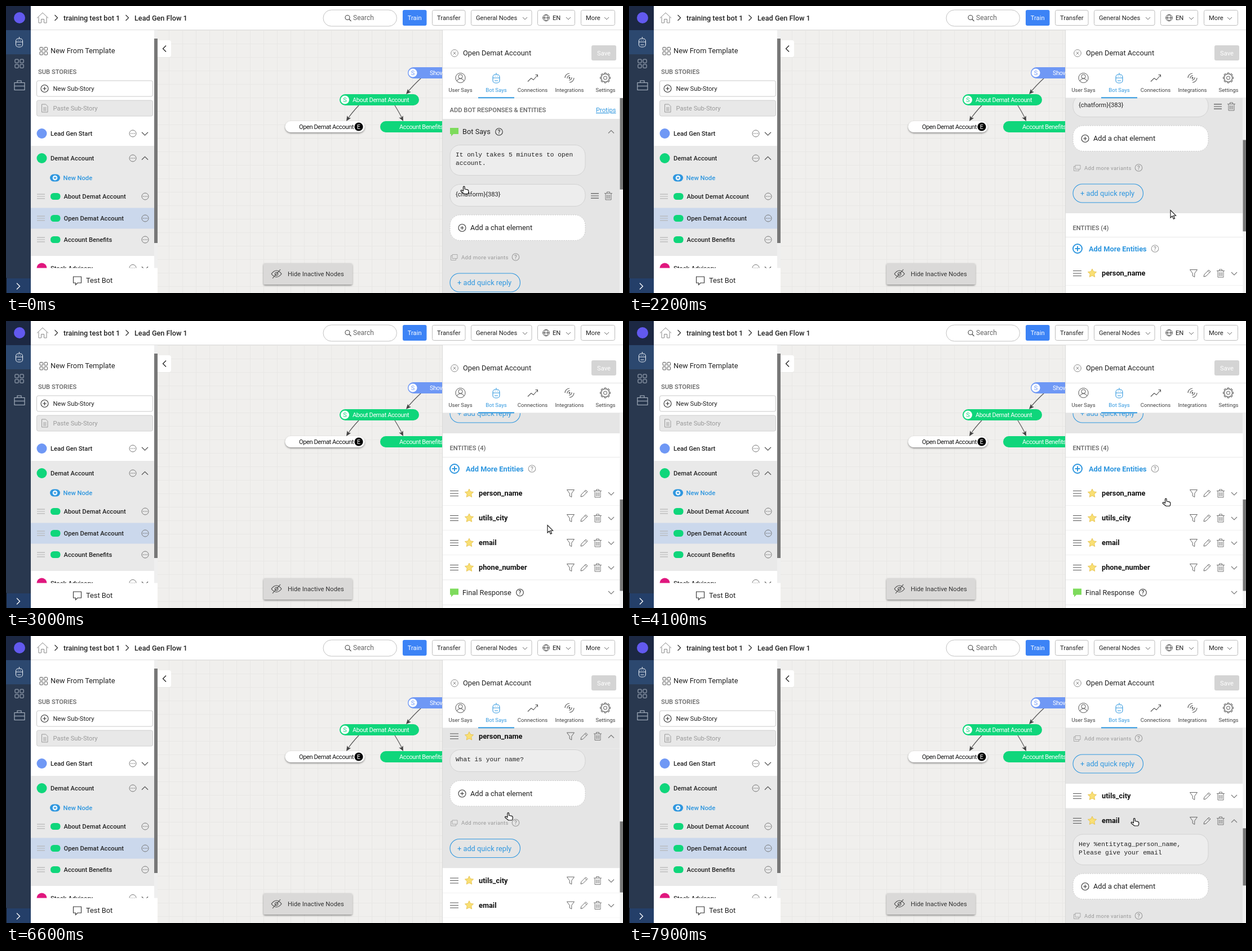
Recreate the animation shown at these times as an HTML page. Size 1095x511 px, loop 8000 ms.

```html
<!DOCTYPE html>
<html lang="en">
<head>
<meta charset="utf-8">
<title>Bot flow editor</title>
<style>
html, body { margin: 0; width: 100%; height: 100%; overflow: hidden; background: #fff; }
svg { display: block; width: 1095px; height: 511px; }
text { font-family: Roboto, sans-serif; white-space: pre; }
.mono { font-family: "Liberation Mono", monospace; }
</style>
</head>
<body>
<svg id="stage" viewBox="0 0 1095 511" xmlns="http://www.w3.org/2000/svg"></svg>
<script>
const INK = '#222', GREY = '#666', BLUE = '#2f97df', GREEN = '#0fd67b', PERI = '#6f98f5', SHADE = '#e5e5e5';

// Drawing helpers: each returns SVG markup.
const rect = (x, y, w, h, fill, extra = '') =>
  `<rect x="${x}" y="${y}" width="${w}" height="${h}" fill="${fill}" ${extra}/>`;
const disc = (x, y, r, fill, extra = '') => `<circle cx="${x}" cy="${y}" r="${r}" fill="${fill}" ${extra}/>`;
const ring = (x, y, r, color, w = 1) => disc(x, y, r, 'none', `stroke="${color}" stroke-width="${w}"`);
const line = (d, color = GREY, w = 1, extra = '') =>
  `<path d="${d}" fill="none" stroke="${color}" stroke-width="${w}" ${extra}/>`;
const shape = (d, fill, extra = '') => `<path d="${d}" fill="${fill}" ${extra}/>`;
const text = (x, y, s, size = 11.2, fill = INK, extra = '') =>
  `<text x="${x}" y="${y}" font-size="${size}" fill="${fill}" ${extra}>${s}</text>`;
const at = (x, y, body, extra = '') => `<g transform="translate(${x} ${y})" ${extra}>${body}</g>`;
const group = (id, body) => `<g id="${id}">${body}</g>`;
const MID = 'text-anchor="middle"', MEDIUM = 'font-weight="500"', BOLD = 'font-weight="700"';

// Icons
const CHEVRON = 'M-5 -2.5L0 2.5L5 -2.5';
const chevron = (x, y, s = 1, up = false, color = '#555', id = '') =>
  at(x, y, `<path ${id && `id="${id}"`} d="${CHEVRON}" transform="scale(${s} ${up ? -s : s})" fill="none" stroke="${color}" stroke-width="1.1"/>`);
const plusRing = (x, y, r = 6.5, color = '#333', w = 1.1) =>
  ring(x, y, r, color, w) + line(`M${x - r / 2} ${y}h${r}M${x} ${y - r / 2}v${r}`, color, w);
const help = (x, y, color = '#333') =>
  ring(x, y, 6.3, color, 1.1) + text(x, y + 3.6, '?', 10, color, MID + MEDIUM);
const dots = (x, y) => ring(x, y, 6, '#777') + [-3, 0, 3].map(d => disc(x + d, y, .8, '#666')).join('');
const bars = (x, y, color = '#555', gap = 4.5, w = 15) =>
  line([-gap, 0, gap].map(d => `M${x - w / 2} ${y + d}h${w}`).join(''), color, 1.2);
const squares = (x, y, s, color) =>
  [0, 1, 2, 3].map(i => rect(x + (i % 2) * s * 1.45, y + (i >> 1) * s * 1.45, s, s, 'none', `rx="1" stroke="${color}"`)).join('');
const trash = (x, y) => at(x, y, line('M-7 -4.5H7M-2.5 -4.5V-7H2.5V-4.5M-5 -4.5V7H5V-4.5M-2.4 -2V5M0 -2V5M2.4 -2V5', '#777'));
const funnel = (x, y) => at(x, y, line('M-6.5 -6.5H6.5L1.8 0V6.5L-1.8 4.5V0Z', '#666'));
const pencil = (x, y) => at(x, y, line('M-6 6L-5 2L3 -6L6 -3L-2 5ZM1.3 -4.3L4.3 -1.3', '#666'));
const bubbleIcon = (x, y) => shape(`M${x} ${y}h15v11h-9l-4 4v-4h-2z`, '#7edb5c');
const robot = (x, y, color) => at(x, y,
  rect(-6, -6, 12, 15, 'none', `rx="4.5" stroke="${color}" stroke-width="1.1"`) +
  line('M-6 0H6M0 -6V-9M-2.5 -3h1.2M1.3 -3h1.2M-3 5H3', color));
const star = (x, y) => {
  const pts = Array.from({ length: 10 }, (_, i) => {
    const a = Math.PI * (i / 5 - .5), r = i % 2 ? 4 : 8;
    return (x + r * Math.cos(a)).toFixed(1) + ',' + (y + r * Math.sin(a)).toFixed(1);
  });
  return `<polygon points="${pts.join(' ')}" fill="#f9df74" stroke="#e3bd45" stroke-width=".8" stroke-linejoin="round"/>`;
};

function sideRail() {
  return rect(0, 0, 44, 511, '#29384f') + rect(0, 0, 44, 43, '#1c2843') + rect(0, 43, 44, 43, '#2c486f') +
    rect(0, 485, 44, 26, '#243f69') + disc(24, 21, 10, '#6259ee') + robot(23.5, 64, '#e4e9f0') +
    squares(16, 95, 6.2, '#aeb8c6') +
    line('M15 136.500h18v13h-18zM20 136.500v-3.500h7v3.500M15 142.500h18', '#aeb8c6', 1.1) +
    line('M19 493.500l5.500 5.500l-5.500 5.500', '#fff', 1.3) + rect(0, 484, 1, 27, '#111');
}

function topBar() {
  const button = (x, w) => rect(x, 7.5, w, 27, '#fff', 'rx="3" stroke="#bcbcbc"');
  return rect(44, 0, 1051, 42.5, '#fff') + rect(44, 42, 1051, 1, '#dedede') +
    line('M55 21.500L65 12l10 9.500M58 19.500V30h4.500v-6.500h5V30H72V19.500', '#888') +
    line('M86.500 16l5 5l-5 5M212.500 16l5 5l-5 5', '#333', 1.3) +
    text(102, 25.5, 'training test bot 1', 12.7, INK, MEDIUM) +
    text(228, 25.5, 'Lead Gen Flow 1', 12.7, INK, MEDIUM) +
    rect(563, 7, 130.5, 29, '#fff', 'rx="14.500" stroke="#c2c2c2"') + ring(606, 20.5, 4, '#444', 1.1) +
    line('M609 23.500l3.500 3.500', '#444', 1.1) + text(616, 25, 'Search', 12, GREY) +
    rect(704, 7, 42.5, 28, '#3c83f6', 'rx="3"') + text(725.2, 25, 'Train', 11.2, '#fff', MID) +
    button(756.5, 58.5) + text(785.8, 25, 'Transfer', 11.2, INK, MID) +
    button(825.5, 107.500) + text(834, 25, 'General Nodes') + chevron(921, 22, .8) +
    button(943.5, 66) + ring(958.5, 21, 5.7, '#444') + line('M952.800 21h11.400M958.500 15.300c-4 4 -4 7.400 0 11.400c4 -4 4 -7.400 0 -11.400', '#444') +
    text(970, 25, 'EN') + chevron(998, 22, .8) +
    button(1020.5, 60) + text(1029, 25, 'More') + chevron(1066, 22, .8);
}

function storyList() {
  const story = (y, color, name, up) => disc(63.5, y, 9, color) + text(79, y + 4, name, 11.2, INK, MEDIUM) +
    dots(225, y) + chevron(246.5, y + (up ? 0 : .5), 1.1, up);
  const node = (y, name) => bars(62, y, '#b5b5b5', 3.8, 14) + rect(79, y - 6, 17.5, 12, GREEN, 'rx="5.500"') +
    text(102.5, y + 4, name, 11.2, INK, MEDIUM) + dots(247, y);
  return rect(44, 43, 225, 468, '#fff') + squares(60, 73.5, 5.5, '#555') + text(79, 84, 'New From Template', 12.8) +
    text(57, 121, 'SUB STORIES', 11.2, GREY, MEDIUM) +
    rect(54.5, 133, 206, 28, '#fff', 'rx="3" stroke="#c9c9c9"') + plusRing(68.5, 147) + text(83.5, 151, 'New Sub-Story') +
    rect(54.5, 168, 206, 28, '#e8e8e8', 'rx="3" stroke="#cfcfcf"') +
    line('M63.500 175h7l3.500 3.500V189H63.500zM66 181h5.500M66 183.500h5.500M66 186h5.500', '#999') + text(83.5, 186, 'Paste Sub-Story', 11.2, '#999') +
    story(227, PERI, 'Lead Gen Start') + rect(44, 249, 219, 196, '#e9e9e9') + story(271, GREEN, 'Demat Account', true) +
    rect(78, 299.5, 18, 13, BLUE, 'rx="6.500"') + disc(87, 306, 4.3, '#fff') + line('M84.500 306h5M87 303.500v5', BLUE, 1.3) +
    text(101.5, 310, 'New Node', 11.2, BLUE, MEDIUM) + rect(44, 359.5, 219, 37, '#cbd8ec') +
    node(339, 'About Demat Account') + node(378, 'Open Demat Account') + node(416, 'Account Benefits') +
    story(466.5, '#e0177e', 'Stock Advisory') + rect(263, 43, 6, 424, '#efefef') + rect(263, 58, 6, 364, '#777') +
    rect(44, 466.5, 225, 45, '#fff') +
    line('M119.500 482h14v11h-6.500l-3.500 3.500v-3.500h-4z', '#333', 1.1) + text(142, 493, 'Test Bot', 12.8);
}

function canvas() {
  const label = (x, y, s, color) => text(x, y + 4, s, 11, color, 'letter-spacing="-.4"');
  const pill = (x, y, w, color, extra = '') => rect(x, y - 10, w, 20, color, 'rx="10" ' + extra);
  const badge = (x, y, s, bg, fg) => disc(x, y, 7.6, bg) + text(x, y + 4, s, 11, fg, MID);
  const arrow = (d, x, y, turn) => line(d, '#555', 1.2) +
    shape('M0 0L-4 -9L0 -7L4 -9Z', '#444', `transform="translate(${x} ${y}) rotate(${turn})"`);
  return rect(269, 43, 506, 468, '#f0efed') + rect(269, 43, 506, 468, 'url(#grid)') +
    arrow('M737 128Q723 141 713 153', 710, 157, 42) + arrow('M626 177Q614 190 607 200', 604, 205, 32) +
    arrow('M690 177Q698 190 703 200', 705, 205, -26) +
    pill(713, 119, 140, PERI) + badge(722, 119, 'S', '#fff', PERI) + label(752, 119, 'Show', '#fff') +
    pill(592, 167, 141, GREEN) + badge(601.5, 167, 'S', '#fff', GREEN) + label(615, 167, 'About Demat Account', '#fff') +
    pill(495.5, 215, 141, '#fff', 'filter="url(#drop)"') + badge(626, 215, 'E', '#000', '#fff') +
    label(520, 215, 'Open Demat Account', '#111') + pill(664, 215, 141, GREEN) + label(698, 215, 'Account Benefits', '#fff') +
    shape('M269 61h20q4 0 4 4v22q0 4 -4 4h-20z', '#fff') + line('M284 70.500l-5.500 5.500l5.500 5.500', '#222', 1.3) +
    rect(457, 458, 157.5, 38, '#dad9d8', 'rx="3" filter="url(#drop)"') +
    line('M471 477q9 -12 18 0q-9 11 -18 0M473 485l14 -16', '#444', 1.1) + ring(480, 477, 2.8, '#444') +
    text(500, 481, 'Hide Inactive Nodes', 11.2, '#333');
}

function panelHead() {
  const tab = (x, name, color = '#444') => text(x, 153, name, 9.6, color, MID);
  const teeth = Array.from({ length: 8 }, (_, i) => `<path d="M-2 -7L-1.300 -9H1.300L2 -7" transform="rotate(${i * 45})"/>`).join('');
  return rect(775, 43, 320, 121, '#fff') + ring(796, 84, 6.3, '#888') + line('M793.500 81.500l5 5M798.500 81.500l-5 5', '#888') +
    text(811, 88, 'Open Demat Account', 12.8) + rect(1039, 70, 44, 27, '#d4d4d4', 'rx="3"') +
    text(1061, 88, 'Save', 11.2, '#fff', MID) + rect(775, 110, 320, 1, '#e2e2e2') +
    ring(806.5, 128, 8.6, '#555') + ring(806.5, 125.5, 3.6, '#555') + line('M800.500 134q0 -4 6 -4.500q6 .5 6 4.500', '#555') +
    robot(870, 128, BLUE) + line('M926 134.500l6 -6l4 3l7.500 -8.500M939.500 122.500h4v4', '#555', 1.1) +
    at(1000, 128, line('M-8 0A8 8 0 0 1 0 -8M-4 1A4.500 4.500 0 0 1 1 -4M8 0A8 8 0 0 1 0 8M4 -1A4.500 4.500 0 0 1 -1 4', '#555', 1.1) + disc(0, 0, 1.5, '#555')) +
    at(1063.5, 128, ring(0, 0, 7, '#555') + ring(0, 0, 3, '#555') + teeth, 'fill="none" stroke="#555"') +
    tab(806.500, 'User Says') + tab(870, 'Bot Says', BLUE) + tab(934.5, 'Connections') + tab(1000, 'Integrations') + tab(1064, 'Settings') +
    rect(775, 163.5, 320, .7, '#ddd') + rect(838, 162.3, 64, 2, BLUE);
}

const bubble = (y, h) => rect(788, y, 240, h, '#ededed', 'rx="18" stroke="#d2d2d2"');
const mono = (y, s) => text(798, y, s, 11.2, INK, 'class="mono"');
const tools = (id, y) => group(id, bars(1045, y, '#555', 4.2, 14) + trash(1069, y));

// "Add a chat element", variants and quick reply, from the top of the dashed box.
const composer = y =>
  rect(788, y, 240, 45.5, '#fff', 'rx="18" stroke="#c8c8c8" stroke-dasharray="2 2"') + plusRing(809.5, y + 23) +
  text(824, y + 27, 'Add a chat element', 12.8) +
  line(`M792 ${y + 70.5}h9v7h-9zM792 ${y + 72.500}h-2.500v8h9v-3`, '#aaa') +
  text(808, y + 78.5, 'Add more variants', 9.6, '#999', 'letter-spacing=".35"') + help(904.5, y + 75, '#999') +
  rect(788, y + 104, 124.5, 33, 'none', `rx="16.500" stroke="${BLUE}" stroke-width="1.1"`) +
  text(801, y + 125, '+ add quick reply', 12.8, BLUE);

function entity(y, name) {
  return rect(775, y - 22, 314.5, 44, '#fff', `id="${name}-bg"`) + rect(775, y + 21.500, 314.5, .8, '#e3e3e3', `id="${name}-rule"`) +
    bars(795.5, y) + star(822, y) + text(839, y + 4, name, 12.8, '#111', BOLD) +
    funnel(1002, y) + pencil(1026, y) + trash(1050, y) + chevron(1074, y + .5, 1, false, '#777', name + '-chev');
}

function panelBody() {
  return rect(775, 164, 320, 1300, '#fff') + text(787.5, 189, 'ADD BOT RESPONSES &amp; ENTITIES', 11.2, GREY, MEDIUM) +
    text(1047, 189, 'Protips', 11.2, BLUE, 'text-decoration="underline"') +
    rect(775, 201, 314.5, 327, SHADE) + bubbleIcon(788, 217) + text(810, 228, 'Bot Says', 12.8) + help(875, 224) +
    chevron(1074, 224, 1, true, '#777') +
    bubble(247.5, 54) + mono(268, 'It only takes 5 minutes to open') + mono(283, 'account.') +
    bubble(317.5, 39) + text(798, 338.5, '{chatform}{383}') + tools('tools-form', 338) + composer(372) +
    text(787.5, 558, 'ENTITIES (4)', 11.2, GREY, MEDIUM) + rect(775, 570, 314.5, .8, '#e3e3e3') +
    ring(796, 591, 8, BLUE, 2) + line('M791.500 591h9M796 586.500v9', BLUE, 2) +
    text(816, 595.5, 'Add More Entities', 12.8, BLUE, BOLD) + help(933.5, 591, '#999') + rect(775, 613, 314.5, .8, '#e3e3e3') +
    rect(775, 657, 314.5, 213, SHADE) + bubble(659, 39) + mono(679.5, 'What is your name?') + tools('tools-name', 679) +
    composer(714) + entity(635, 'person_name') +
    group('after-name',
      rect(775, 657, 314.5, 700, '#fff') + entity(679, 'utils_city') +
      rect(775, 745, 314.5, 228, SHADE) + bubble(747, 54.5) + mono(768, 'Hey %entitytag_person_name,') +
      mono(783, 'Please give your email') + composer(817) + entity(723, 'email') +
      group('after-email', rect(775, 745, 314.5, 700, '#fff') + entity(767, 'phone_number') +
        bubbleIcon(788, 804.500) + text(810, 815.5, 'Final Response', 12.8) + help(912, 811.5) +
        chevron(1074, 811.5, 1, false, '#777') + rect(775, 833, 314.5, .8, '#e3e3e3')));
}

const stage = document.getElementById('stage');
stage.innerHTML = `<defs>
  <pattern id="grid" x="265" y="43" width="24" height="24" patternUnits="userSpaceOnUse"><path d="M0 .5H24M.5 0V24" stroke="#e8e7e5" fill="none"/></pattern>
  <filter id="drop" x="-10%" y="-40%" width="120%" height="200%"><feDropShadow dx="0" dy="1.5" stdDeviation="1.500" flood-opacity=".45"/></filter>
  <clipPath id="view"><rect x="775" y="164" width="320" height="347"/></clipPath></defs>` +
  canvas() + storyList() + topBar() + sideRail() + rect(774, 43, 1, 468, '#d9d9d9') +
  `<g clip-path="url(#view)">${group('scroll', panelBody())}</g>` + panelHead() +
  rect(1089.5, 164, 5.500, 347, '#f0f0f0') + rect(1089.500, 164, 5.500, 163, '#777', 'id="thumb"') +
  group('cursor',
    shape('M-2.500 1V-5a1.300 1.300 0 0 1 2.600 0V-1.500l4.500 .8q2.200 .5 2.200 2.300v2q0 2.800 -1.600 3.400h-6L-6.500 2.500q-1 -2 1 -2.200l3 1.700z', '#fff', 'id="hand" stroke="#111" stroke-width="1.2" stroke-linejoin="round"') +
    shape('M0 0V13.500l3.200 -3l2.200 5.200l2.200 -1l-2.200 -5h4.200z', '#fff', 'id="arrow" stroke="#111" stroke-width="1.1"'));

const $ = id => document.getElementById(id);
const show = (id, on) => $(id).setAttribute('visibility', on ? 'visible' : 'hidden');
const shift = (id, x, y) => $(id).setAttribute('transform', `translate(${x} ${y})`);

// Linear value of track keys [time, value, ...] at time t.
function sample(keys, t, i = 1) {
  const n = keys.findIndex(k => k[0] > t);
  if (n < 0) return keys[keys.length - 1][i];
  if (n === 0) return keys[0][i];
  const a = keys[n - 1], b = keys[n];
  return a[i] + (b[i] - a[i]) * (t - a[0]) / (b[0] - a[0]);
}
const ease = (t, from, to) => {
  const k = Math.min(1, Math.max(0, (t - from) / (to - from)));
  return k * k * (3 - 2 * k);
};

const SCROLL = [[1400, 0], [2200, 159], [3000, 328], [6300, 328], [6600, 456.5], [7000, 607]];
const POINTER = [[600, 814, 327.5], [800, 741, 345], [1000, 961, 363.5], [3100, 961, 363.5], [3500, 955, 324.5],
  [3700, 954, 322.5], [4500, 954, 322.5], [4700, 941, 334], [5300, 877, 350], [5700, 902, 354],
  [6000, 892.5, 321], [7300, 892.5, 321], [7500, 898, 331]];

function unfold(name, k) {
  $(name + '-bg').setAttribute('fill', k ? SHADE : '#fff');
  show(name + '-rule', !k);
  $(name + '-chev').setAttribute('transform', `scale(1 ${k ? -1 : 1})`);
}

function draw(now) {
  const t = Math.floor(now % 8000 / 100) * 100;
  const top = sample(SCROLL, t), x = sample(POINTER, t, 1), y = sample(POINTER, t, 2);
  const nameOpen = ease(t, 4200, 4600), mailOpen = ease(t, 7500, 7900);
  const full = 740 + 213 * nameOpen + 228 * mailOpen, ratio = 347 / full;

  shift('scroll', 0, -top);
  shift('after-name', 0, 213 * nameOpen);
  shift('after-email', 0, 228 * mailOpen);
  unfold('person_name', nameOpen);
  unfold('email', mailOpen);
  $('thumb').setAttribute('y', 164 + top * ratio);
  $('thumb').setAttribute('height', 347 * ratio);

  show('tools-form', x > 780);
  show('tools-name', nameOpen === 1 && t < 6000 && y > 332);
  const arrow = t >= 700 && t < 3200;
  show('arrow', arrow);
  show('hand', !arrow);
  shift('cursor', x, y);
}

function loop(now) {
  draw(now);
  requestAnimationFrame(loop);
}
draw(0);
requestAnimationFrame(loop);
</script>
</body>
</html>
```
